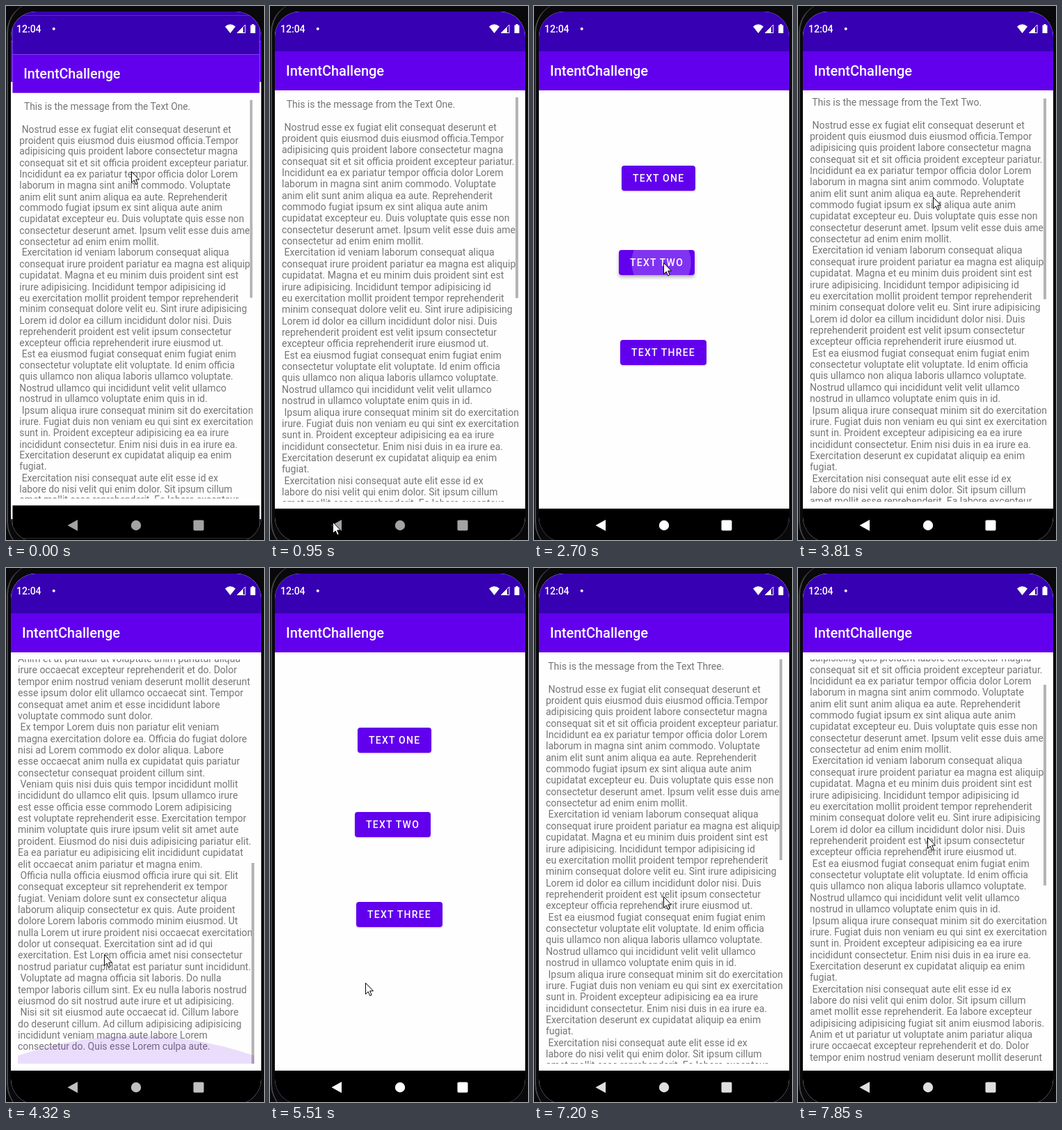
Write an HTML page that moves like this. It is 371 px wide and 766 px high and loops after 8 s.

```html
<!DOCTYPE html>
<html lang="en">
<head>
<meta charset="utf-8">
<title>IntentChallenge</title>
<style>
html, body { margin: 0; width: 100%; height: 100%; overflow: hidden; background: #09090b; }
body { position: relative; font-family: Roboto, sans-serif; }
body * { position: absolute; box-sizing: border-box; }
.edge { left: 1px; top: -6px; width: 390px; height: 790px; border-left: 2px solid #46464a; border-radius: 44px; }
.screen { left: 7px; top: 8px; width: 360px; height: 761px; overflow: hidden; border-radius: 36px; background: #3700b3; }
.window { inset: 0; transform-origin: 180px 380px; background: #fefefe; }
.status { width: 100%; height: 57px; background: #3700b3; }
.bar { top: 57px; width: 100%; height: 56px; padding-left: 16px; background: #6200ee; color: #fff; font-size: 20px; font-weight: 500; line-height: 57px; }
.nav { top: 713px; width: 100%; height: 48px; background: #000; }
.button { height: 36px; padding: 0 16px; overflow: hidden; border-radius: 4px; background: #6200ee; color: #fff; font-size: 14px; font-weight: 500; line-height: 36px; letter-spacing: 1.25px; white-space: nowrap; box-shadow: 0 1px 2px rgba(0, 0, 0, .25); }
.button.down { box-shadow: 0 3px 5px rgba(0, 0, 0, .3); }
.ripple { border-radius: 50%; background: rgba(255, 255, 255, .2); transform: translate(-50%, -50%); }
.view { left: 10px; top: 123px; width: 340px; height: 580px; overflow: hidden; }
#copy { left: 0; top: 1.8px; margin: 0; font: 14px/16.364px Roboto, sans-serif; color: #757575; white-space: pre; }
#thumb { right: 0; top: 0; width: 4px; height: 288px; background: #b4b4b4; }
#glow { left: -350px; top: 580px; width: 1040px; height: 1040px; border-radius: 50%; background: #6200ee; }
svg { left: 0; top: 0; overflow: visible; }
</style>
</head>
<body>
<div class="edge"></div>
<div class="screen">
  <div class="window" id="menu">
    <div class="status"></div>
    <div class="bar">IntentChallenge</div>
    <div class="button" style="left:119px;top:221px">TEXT ONE</div>
    <div class="button" id="two" style="left:115px;top:342px">TEXT TWO<i class="ripple" style="left:61px;top:18px"></i></div>
    <div class="button" id="three" style="left:117px;top:470.5px">TEXT THREE<i class="ripple" style="left:50px;top:14px"></i></div>
    <div class="nav"></div>
  </div>
  <div class="window" id="reader">
    <div class="status"></div>
    <div class="bar">IntentChallenge</div>
    <div class="view">
      <pre id="copy"></pre>
      <div id="thumb"></div>
      <div id="glow"></div>
    </div>
    <div class="nav"></div>
  </div>
</div>
<svg width="371" height="766">
  <g fill="#fff">
    <text x="15" y="38" font-size="14" font-weight="500">12:04</text>
    <circle cx="68.7" cy="32.7" r="2"/>
    <path d="M322.5 39L315 29.5Q322.500 23 330 29.500Z"/>
    <path d="M332.500 38.500L344 27V38.500Z" fill="none" stroke="#fff"/>
    <path d="M332 39L341 30V39Z"/>
    <path d="M353.500 26H356.500V27.500H358.500V39H351.500V27.500H353.500Z"/>
  </g>
  <g id="keys">
    <path d="M88.500 745L103 737V753Z"/>
    <circle cx="187" cy="745" r="7.200"/>
    <rect x="269.500" y="737.500" width="15" height="15" rx="1.800"/>
  </g>
  <path id="pointer" d="M.5 .5V16.500L4.200 13L6.700 18.800L9.200 17.700L6.700 12H11.500Z" fill="#fff" stroke="#000"/>
</svg>
<script>
const BODY = ` Nostrud esse ex fugiat elit consequat deserunt et
proident quis eiusmod duis eiusmod officia.Tempor
adipisicing quis proident labore consectetur magna
consequat sit et sit officia proident excepteur pariatur.
Incididunt ea ex pariatur tempor officia dolor Lorem
laborum in magna sint anim commodo. Voluptate
anim elit sunt anim aliqua ea aute. Reprehenderit
commodo fugiat ipsum ex sint aliqua aute anim
cupidatat excepteur eu. Duis voluptate quis esse non
consectetur deserunt amet. Ipsum velit esse duis amet
consectetur ad enim enim mollit.
 Exercitation id veniam laborum consequat aliqua
consequat irure proident pariatur ea magna est aliquip
cupidatat. Magna et eu minim duis proident sint est
irure adipisicing. Incididunt tempor adipisicing id
eu exercitation mollit proident tempor reprehenderit
minim consequat dolore velit eu. Sint irure adipisicing
Lorem id dolor ea cillum incididunt dolor nisi. Duis
reprehenderit proident est velit ipsum consectetur
excepteur officia reprehenderit irure eiusmod ut.
 Est ea eiusmod fugiat consequat enim fugiat enim
consectetur voluptate elit voluptate. Id enim officia
quis ullamco non aliqua laboris ullamco voluptate.
Nostrud ullamco qui incididunt velit velit ullamco
nostrud in ullamco voluptate enim quis in id.
 Ipsum aliqua irure consequat minim sit do exercitation
irure. Fugiat duis non veniam eu qui sint ex exercitation
sunt in. Proident excepteur adipisicing ea ea irure
incididunt consectetur. Enim nisi duis in ea irure ea.
Exercitation deserunt ex cupidatat aliquip ea enim
fugiat.
 Exercitation nisi consequat aute elit esse id ex
labore do nisi velit qui enim dolor. Sit ipsum cillum
amet mollit esse reprehenderit. Ea labore excepteur
adipisicing adipisicing fugiat sit anim eiusmod laboris.
Anim et ut pariatur ut voluptate anim pariatur aliqua
irure occaecat excepteur reprehenderit et do. Dolor
tempor enim nostrud veniam deserunt mollit deserunt
esse ipsum dolor elit ullamco occaecat sint. Tempor
consequat amet anim et esse incididunt labore
voluptate commodo sunt dolor.
 Ex tempor Lorem duis non pariatur elit veniam
magna exercitation dolore ea. Officia do fugiat dolore
nisi ad Lorem commodo ex dolor aliqua. Labore
esse occaecat anim nulla ex cupidatat quis pariatur
consectetur consequat proident cillum sint.
 Veniam quis nisi duis quis tempor incididunt mollit
incididunt do ullamco elit quis. Ipsum ullamco irure
est esse officia esse commodo Lorem adipisicing
est voluptate reprehenderit esse. Exercitation tempor
minim voluptate quis irure ipsum velit sit amet aute
proident. Eiusmod do nisi duis adipisicing pariatur elit.
Ea ea pariatur eu adipisicing elit incididunt cupidatat
elit occaecat anim pariatur et magna enim.
 Officia nulla officia eiusmod officia irure qui sit. Elit
consequat excepteur sit reprehenderit ex tempor
fugiat. Veniam dolore sunt ex consectetur aliqua
laborum aliquip consectetur ex quis. Aute proident
dolore Lorem laboris commodo minim eiusmod. Ut
nulla Lorem ut irure proident nisi occaecat exercitation
dolor ut consequat. Exercitation sint ad id qui
exercitation. Est Lorem officia amet nisi consectetur
nostrud pariatur cupidatat est pariatur sunt incididunt.
 Voluptate ad magna officia sit laboris. Do nulla
tempor laboris cillum sint. Ex eu nulla laboris nostrud
eiusmod do sit nostrud aute irure et ut adipisicing.
 Nisi sit sit eiusmod aute occaecat id. Cillum labore
do deserunt cillum. Ad cillum adipisicing adipisicing
incididunt veniam magna aute labore Lorem
consectetur do. Quis esse Lorem culpa aute.`;

const LOOP = 8000, MAX_SCROLL = 616.5, MOVE = 300;
const OPENS = [-244, 2790, 6890], CLOSES = [1400, 4914];

// Screen updates come in bursts: first time, last time, count.
const BURSTS = [[0, 0, 1], [160, 950, 7], [1370, 2310, 8], [2430, 2430, 1], [2700, 3540, 7],
  [3810, 4710, 8], [4860, 5810, 7], [5940, 6090, 2], [6360, 7200, 7], [7470, 7850, 4]];

const POINTER = [[0, 180, 237], [160, 180, 237], [950, 90, 740], [1504, 90, 740], [2310, 186, 362],
  [2430, 186, 368], [3120, 186, 368], [3540, 194, 285], [3810, 194, 274], [3940, 190, 215],
  [4324, 141, 554], [4710, 95, 740], [5050, 95, 740], [5810, 167, 491], [6090, 167, 497],
  [6360, 167, 497], [6780, 169, 486], [7060, 169, 486], [7200, 186, 471], [7470, 186, 460], [7850, 186, 386]];
const SCROLL = [[3540, 0], [3810, 3.5], [3940, 70], [4200, 540], [4324, MAX_SCROLL],
  [5400, MAX_SCROLL], [5401, 0], [7200, 0], [7470, 5], [7850, 77]];
const GLOW = [[4150, 0], [4324, 40], [4710, 0]];
const KEYS = [[1400, 163], [1700, 255], [3810, 255], [4324, 192], [4914, 192], [5200, 255], [6900, 255], [7200, 223]];

const el = id => document.getElementById(id);
const clamp = v => Math.min(1, Math.max(0, v));
const smooth = u => u * u * (3 - 2 * u);

function track(keys, t, col = 1) {
  const i = keys.findIndex(k => k[0] > t);
  if (i < 0) return keys.at(-1)[col];
  if (i === 0) return keys[0][col];
  const a = keys[i - 1], b = keys[i];
  return a[col] + (b[col] - a[col]) * (t - a[0]) / (b[0] - a[0]);
}

function heldTime(t) {
  const now = t + 12;
  const [first, last, count] = BURSTS.findLast(b => b[0] <= now);
  const step = count > 1 ? (last - first) / (count - 1) : 1;
  return first + step * Math.min(count - 1, Math.floor((now - first) / step));
}

function drawWindows(t) {
  const opened = OPENS.findLast(s => s <= t);
  const closed = CLOSES.findLast(s => s <= t) ?? -Infinity;
  const opening = opened > closed;
  const u = clamp((t - Math.max(opened, closed)) / MOVE), p = smooth(u);
  el("menu").style.transform = `scale(${opening ? 1 + .05 * p : 1.1 - .1 * p})`;
  el("reader").style.transform = `scale(${opening ? .85 + .15 * p : 1 - .1 * p})`;
  el("reader").style.opacity = opening ? clamp(3 * u) : clamp(1.2 - 2 * u);
}

function drawPress(id, start, t) {
  const age = t - start, down = age >= 0 && age < 450;
  el(id).classList.toggle("down", down);
  const ripple = el(id).querySelector("i").style;
  ripple.width = ripple.height = (down ? 86 + age * .6 : 0) + "px";
}

let shown;
function drawReader(t) {
  const title = t < 2400 ? " This is the message from the Text One."
    : `This is the message from the Text ${t < 5400 ? "Two" : "Three"}.`;
  if (title !== shown) el("copy").textContent = ` ${shown = title}\n\n${BODY}`;
  const y = track(SCROLL, t), glow = track(GLOW, t);
  el("copy").style.transform = `translateY(${-y}px)`;
  el("thumb").style.transform = `translateY(${292 * y / MAX_SCROLL}px)`;
  el("glow").style.transform = `translateY(${-glow}px)`;
  el("glow").style.opacity = .13 * glow / 40;
}

const start = performance.now();
function frame() {
  const t = heldTime((performance.now() - start) % LOOP);
  drawWindows(t);
  drawPress("two", 2700, t);
  drawPress("three", 6800, t);
  drawReader(t);
  const grey = track(KEYS, t);
  el("keys").setAttribute("fill", `rgb(${grey},${grey},${grey})`);
  el("pointer").setAttribute("transform", `translate(${track(POINTER, t)} ${track(POINTER, t, 2)})`);
  requestAnimationFrame(frame);
}
frame();
</script>
</body>
</html>
```
